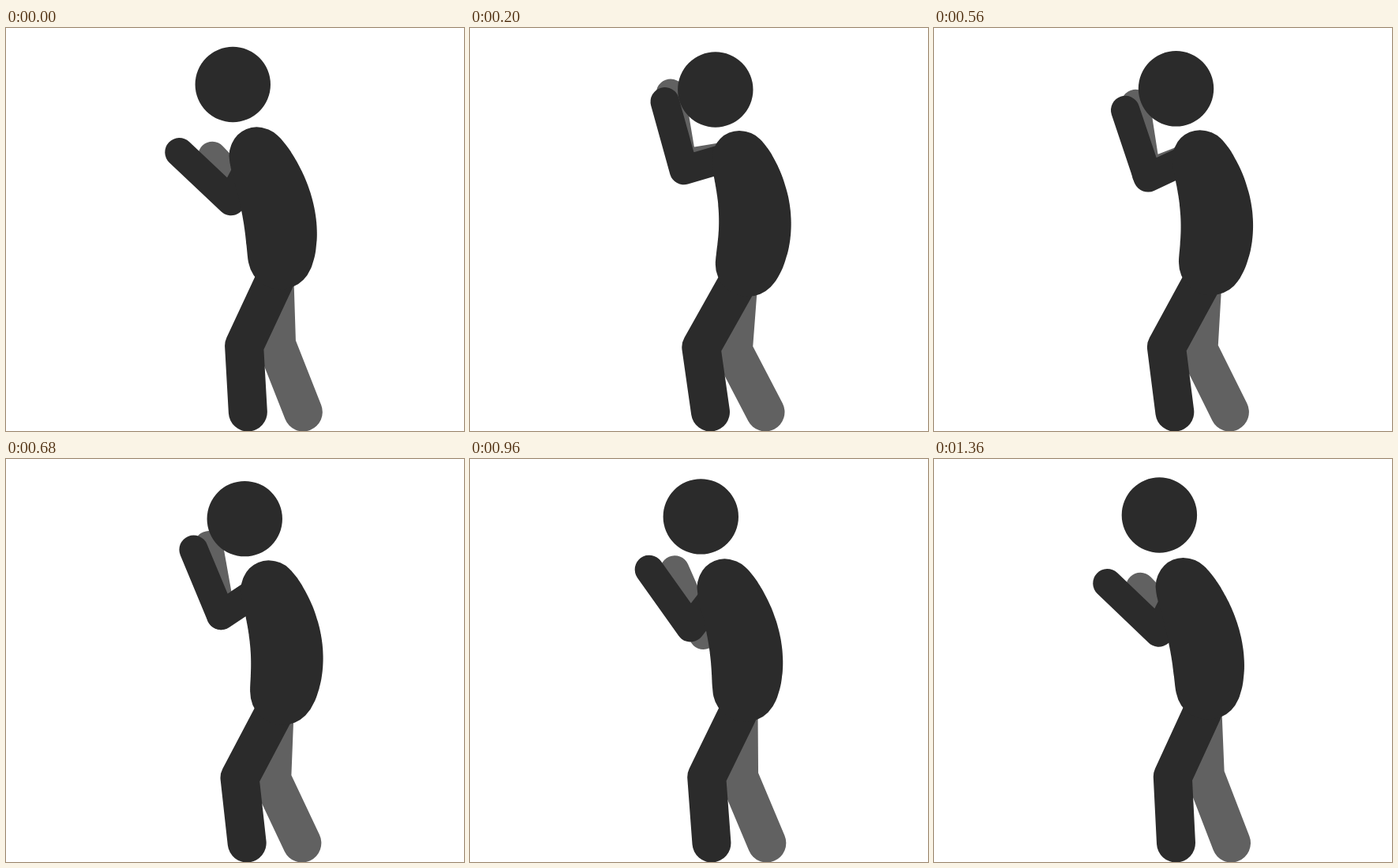
Animation, 580 px wide and 510 px high, one loop 1.6 s. Source, as an HTML page with a canvas:

```html
<!DOCTYPE html>
<html lang="en">
<head>
<meta charset="utf-8">
<title>Stick figure</title>
<style>
  html, body { margin: 0; width: 100%; height: 100%; overflow: hidden; background: #fff; }
  canvas { display: block; }
</style>
</head>
<body>
<canvas id="stage" width="580" height="510"></canvas>
<script>
const ctx = document.getElementById('stage').getContext('2d');
const LOOP = 1600, STEP = 40;
const DARK = '#2b2b2b', GREY = '#616161';
const UPPER_ARM = 71, FOREARM = 90, ARM_WIDTH = 36.5, LEG_WIDTH = 49;
const HIP = [340, 320];

// [x, y] at rest, then [x, y] when fully raised.
const head = mover(285.4, 71, 310.8, 78);
const chest = mover(315.5, 159, 341, 164);
const waist = mover(354, 231, 375, 238);
const pelvis = mover(347, 291, 351, 301);
const shoulder = mover(316.5, 156, 339, 160);
const frontHand = mover(219.5, 157.3, 246.8, 93.3);
const backHand = mover(261.3, 162, 254, 82.7);
const frontKnee = mover(302.3, 402, 292.8, 404);
const frontFoot = mover(306.5, 486, 304.5, 486);
const backKnee = mover(343.3, 400, 333.3, 408);
const backFoot = mover(376.5, 486, 374, 486);

function mover(x0, y0, x1, y1) {
  return p => [x0 + (x1 - x0) * p, y0 + (y1 - y0) * p];
}

const smooth = u => u * u * (3 - 2 * u);
const quadratic = (a, b, c, u) => a * (1 - u) ** 2 + 2 * b * u * (1 - u) + c * u * u;

// Quick rise, hold, steady lowering, slow settling.
function raise(t, riseStart) {
  if (t < 200) return smooth((t - riseStart) / (200 - riseStart));
  if (t < 440) return 1;
  if (t < 1120) return 1 - (t - 440) * 0.0014;
  return 0.05 * Math.max(0, (1360 - t) / 240) ** 2;
}

function limb(points, width, color) {
  ctx.strokeStyle = color;
  ctx.lineWidth = width;
  ctx.beginPath();
  points.forEach(p => ctx.lineTo(...p));
  ctx.stroke();
}

// Two-bone arm: the elbow follows from the shoulder and the hand.
function arm([sx, sy], [hx, hy], color) {
  const d = Math.hypot(hx - sx, hy - sy);
  const along = (d * d + UPPER_ARM ** 2 - FOREARM ** 2) / (2 * d);
  const out = Math.sqrt(UPPER_ARM ** 2 - along ** 2);
  const ux = (hx - sx) / d, uy = (hy - sy) / d;
  const elbow = [sx + ux * along + uy * out, sy + uy * along - ux * out];
  limb([[sx, sy], elbow, [hx, hy]], ARM_WIDTH, color);
}

function disc(x, y, r) {
  ctx.moveTo(x + r, y);
  ctx.arc(x, y, r, 0, 2 * Math.PI);
}

// The torso is a disc of changing radius swept along a bent spine.
function torso(p) {
  const [a, b, c] = [chest(p), waist(p), pelvis(p)];
  for (let i = 0; i <= 60; i++) {
    const u = i / 60;
    const bulge = Math.sqrt(Math.max(0, Math.sin(Math.PI * u)));
    disc(quadratic(a[0], b[0], c[0], u), quadratic(a[1], b[1], c[1], u), 34 + 5 * u + 9 * bulge);
  }
}

function draw(t) {
  const body = raise(t, -40), hands = raise(t, 0);
  ctx.fillStyle = '#fff';
  ctx.fillRect(0, 0, 580, 510);
  ctx.lineCap = ctx.lineJoin = 'round';

  arm(shoulder(body), backHand(hands), GREY);
  limb([HIP, backKnee(body), backFoot(body)], LEG_WIDTH, GREY);
  limb([HIP, frontKnee(body), frontFoot(body)], LEG_WIDTH, DARK);
  arm(shoulder(body), frontHand(hands), DARK);

  ctx.fillStyle = DARK;
  ctx.beginPath();
  torso(body);
  disc(...head(body), 47.7);
  ctx.fill();
}

const start = performance.now();
function tick() {
  const t = (performance.now() - start) % LOOP;
  draw(Math.floor(t / STEP) * STEP);
  requestAnimationFrame(tick);
}
tick();
</script>
</body>
</html>
```
